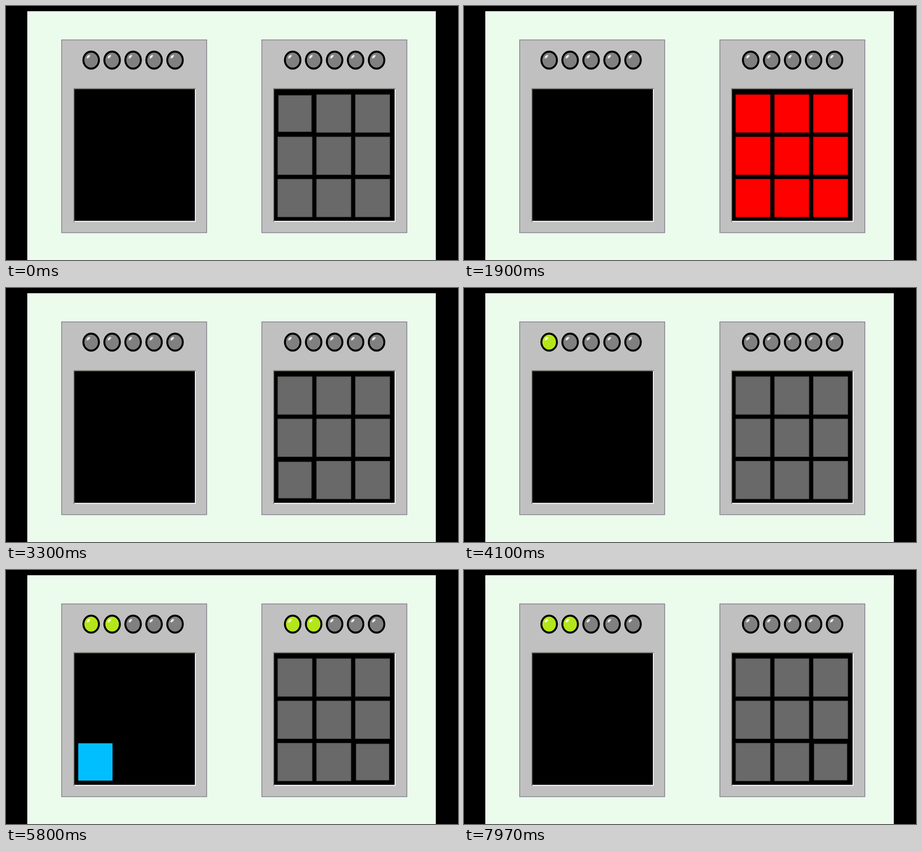
An HTML page with a canvas that plays this animation: 998x561 px, repeating every 8 s.

```html
<!DOCTYPE html>
<html lang="en">
<head>
<meta charset="utf-8">
<title>Memory panel</title>
<style>
  html, body { margin: 0; width: 100%; height: 100%; overflow: hidden; background: #000; }
  canvas { display: block; }
</style>
</head>
<body>
<canvas id="stage" width="998" height="561"></canvas>
<script>
const ctx = document.getElementById('stage').getContext('2d');
const LOOP = 8000;
const BLUE = '#00bfff', RED = '#ff0000', LIME = '#b4e61a', GREY = '#696969';

// Keys are numbered 0-8 by row. Times are in milliseconds.
const shown = [
  [6, 400, 1040], [6, 1930, 2570],
  [6, 3430, 4030], [8, 4170, 4800],
  [6, 5770, 6400], [8, 6540, 7180], [8, 7310, 7940]
];
const pressed = [
  [0, 0, 300], [4, 1770, 1830], [6, 3300, 3500], [6, 5130, 5300], [8, 5570, 8000]
];
const lit = [[6, 3400, 3500], [6, 5200, 5300], [8, 5670, 5770]];
const errors = [[300, 500], [1830, 2030]];

const within = (t, from, to) => t >= from && t < to;
const active = (list, key, t) => list.some(([k, from, to]) => k === key && within(t, from, to));

function rect(x, y, w, h, color) {
  ctx.fillStyle = color;
  ctx.fillRect(x, y, w, h);
}

function ellipse(x, y, rx, ry, color, angle = 0) {
  ctx.fillStyle = color;
  ctx.beginPath();
  ctx.ellipse(x, y, rx, ry, angle, 0, Math.PI * 2);
  ctx.fill();
}

function lamp(x, on) {
  const y = 119.5;
  ellipse(x, y, 19.3, 21, '#000');
  ellipse(x, y, 15, 16.6, on ? LIME : '#808080');
  ellipse(x - 6, y - 7.5, 5.5, 2.6, on ? '#e4f8a0' : '#c4c4c4', -0.8);
  ellipse(x - 6.5, y - 8, 3.4, 1.5, '#fff', -0.8);
}

function panel(x, screenX, lampX, lampsOn) {
  rect(x, 74, 322, 427.5, '#85858f');
  rect(x + 1.7, 75.7, 318.6, 424.1, '#c0c0c0');
  rect(screenX - 2, 181.5, 270, 295.5, '#808078');
  rect(screenX, 183.5, 268, 293.5, '#f4f4ff');
  rect(screenX, 183.5, 266, 291, '#000');
  for (let i = 0; i < 5; i++) lamp(lampX + i * 46.3, i < lampsOn);
}

function key(i, t) {
  const inset = active(pressed, i, t) ? 1.7 : 0;
  const x = 599.5 + i % 3 * 85.7 + inset;
  const y = 195.3 + Math.floor(i / 3) * 93.3 + inset;
  const w = 77 - 2 * inset, h = 84.5 - 2 * inset;
  const wrong = errors.some(([from, to]) => within(t, from, to));
  const on = active(lit, i, t);
  rect(x, y, w, h, wrong ? '#c00000' : on ? '#58d4ff' : '#505050');
  rect(x + 1.2, y + 1.2, w - 2.4, h - 2.4, wrong ? RED : on ? BLUE : GREY);
}

function draw(t) {
  const rounds = t < 3400 ? 0 : t < 5670 ? 1 : 2;
  const presses = within(t, 3400, 4030) || within(t, 5200, 5670) ? 1
    : within(t, 5670, 6400) ? 2 : 0;

  rect(0, 0, 998, 561, '#000');
  rect(47, 11.5, 902, 550, '#ebfcec');
  panel(122, 151, 188, rounds);
  panel(564, 592, 633, presses);

  for (let i = 0; i < 9; i++) {
    key(i, t);
    if (active(shown, i, t)) {
      rect(159.5 + i % 3 * 86, 195.7 + Math.floor(i / 3) * 93.5, 75.7, 82.5, BLUE);
    }
  }
}

function frame() {
  draw(performance.now() % LOOP);
  requestAnimationFrame(frame);
}
frame();
</script>
</body>
</html>
```
